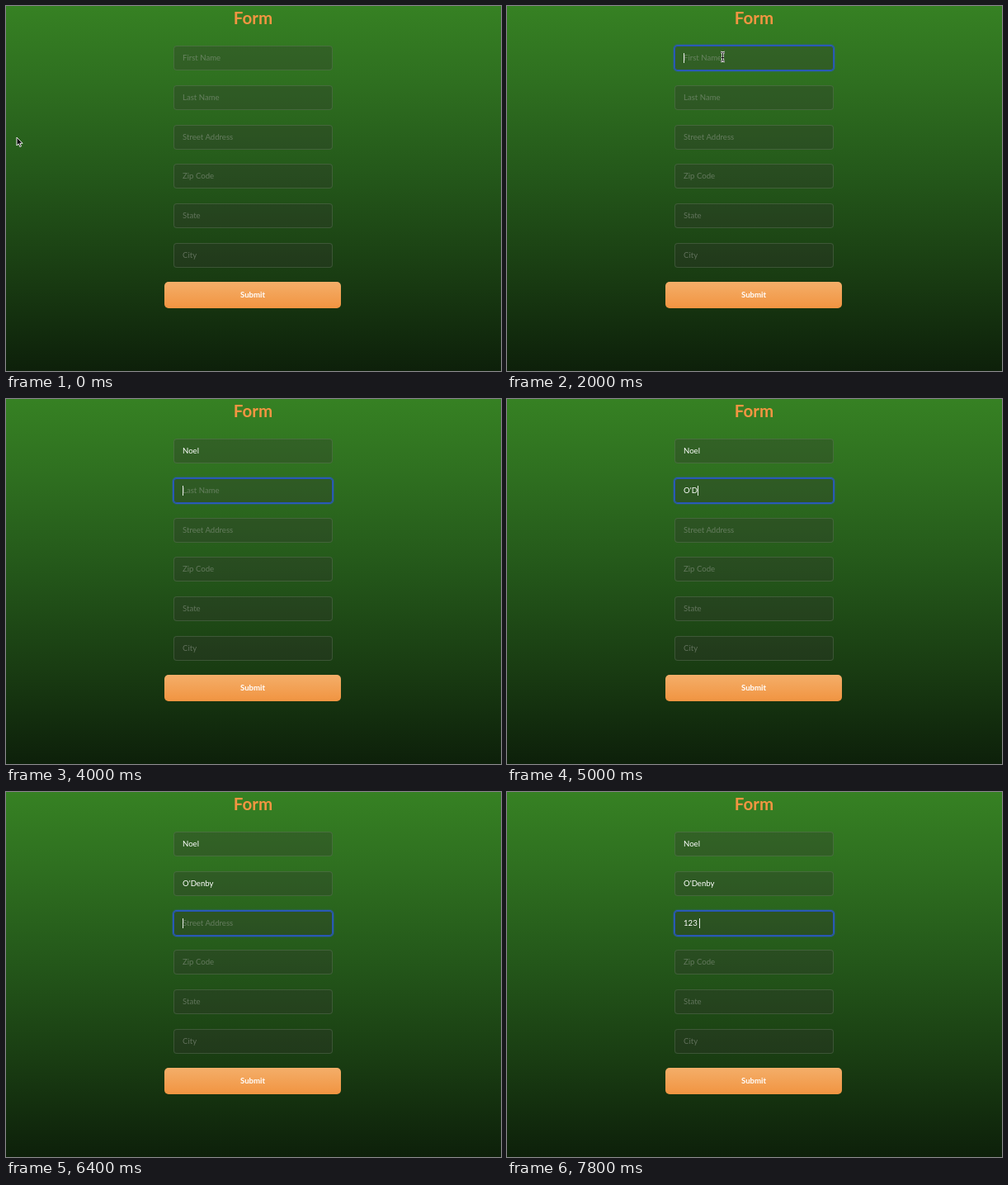
Animation, 600 px wide and 442 px high, one loop 8 s. Source, as an HTML page:

```html
<!DOCTYPE html>
<html lang="en">
<head>
<meta charset="utf-8">
<title>Form</title>
<style>
  html, body { margin: 0; width: 100%; height: 100%; overflow: hidden; }
  #stage {
    position: relative; width: 600px; height: 442px; overflow: hidden;
    background: linear-gradient(#368123, #2f7020 20%, #24581a 46%, #193c12 74%, #0d200a);
    font: 9.6px/30px Lato, "Open Sans", sans-serif; color: #fff;
  }
  h1 {
    position: absolute; left: 0; top: 0; width: 599px; margin: 0;
    font: 700 20.5px/29px Lato, "Open Sans", sans-serif; text-align: center; color: #f39542;
  }
  .field {
    position: absolute; left: 203px; width: 193px; height: 30px; padding-left: 11px;
    box-sizing: border-box; border-radius: 4px; white-space: pre;
    background: rgba(52, 48, 46, .3); box-shadow: inset 0 0 0 1px rgba(118, 140, 112, .32);
  }
  .focused { box-shadow: 0 0 0 1px #2b5cbe, inset 0 0 0 1px #2855ae, 0 0 2px 1px #2b5cbe; }
  .hint { color: rgba(160, 166, 156, .5); }
  .caret {
    display: inline-block; width: 1px; height: 12px; margin-right: -1px;
    vertical-align: -2.5px; background: #e8eee6;
  }
  .submit {
    position: absolute; left: 192px; top: 334px; width: 214px; height: 32px; border-radius: 5px;
    background: linear-gradient(#f4ae69, #f19441); font-weight: 700; line-height: 32px; text-align: center;
  }
  svg { position: absolute; left: 0; top: 0; overflow: visible; }
</style>
</head>
<body>
<div id="stage">
  <h1>Form</h1>
  <div class="submit">Submit</div>
  <svg id="pointer" width="1" height="1">
    <path id="arrow" d="M.5 .5V10.5L2.8 8.4L4.3 12L6 11.3L4.5 7.8H7.6Z" fill="#111" stroke="#fff" stroke-width=".9"/>
    <g id="beam" fill="none">
      <path d="M-2.5-5.5Q0-5.5 0-4Q0-5.5 2.5-5.5M0-4V4M-2.5 5.5Q0 5.5 0 4Q0 5.5 2.5 5.5M-1.5 1H1.5" stroke="#fff" stroke-width="2.4"/>
      <path d="M-2.5-5.5Q0-5.5 0-4Q0-5.5 2.5-5.5M0-4V4M-2.5 5.5Q0 5.5 0 4Q0 5.5 2.5 5.5M-1.5 1H1.5" stroke="#111"/>
    </g>
  </svg>
</div>
<script>
const LOOP = 8000, STEP = 200, BLINK = 1000;
const stage = document.getElementById("stage");
const pointer = document.getElementById("pointer");
const arrow = document.getElementById("arrow");
const beam = document.getElementById("beam");

// focus: when the field becomes active; keys: when each character appears
const entries = [
  { focus: 1000, text: "Noel", keys: [2600, 2800, 3000, 3200] },
  { focus: 4000, text: "O'Denby", keys: [4400, 4800, 5000, 5200, 5400, 5600, 5800] },
  { focus: 6200, text: "123 ", keys: [7200, 7400, 7600, 7800] }
];

function addSpan(parent, className) {
  const span = document.createElement("span");
  span.className = className;
  return parent.appendChild(span);
}

const labels = ["First Name", "Last Name", "Street Address", "Zip Code", "State", "City"];
const fields = labels.map((label, i) => {
  const box = document.createElement("div");
  box.style.top = 48 + Math.round(i * 47.8) + "px";
  stage.insertBefore(box, pointer);
  const value = addSpan(box, "value");
  const caret = addSpan(box, "caret");
  const hint = addSpan(box, "hint");
  hint.textContent = label;
  return { box, value, caret, hint };
});

function drawField(field, i, t) {
  const entry = entries[i];
  const next = entries[i + 1];
  const focused = Boolean(entry) && t >= entry.focus && (!next || t < next.focus);
  const typed = entry ? entry.keys.filter(key => key <= t).length : 0;
  const lastEvent = typed ? entry.keys[typed - 1] : entry && entry.focus;
  const caretOn = focused && (t - lastEvent) % BLINK < BLINK / 2;

  field.box.className = focused ? "field focused" : "field";
  field.value.textContent = typed ? entry.text.slice(0, typed) : "";
  field.hint.style.display = typed ? "none" : "";
  field.caret.style.display = focused ? "" : "none";
  field.caret.style.visibility = caretOn ? "visible" : "hidden";
}

function drawPointer(t) {
  const p = Math.min(t / 1000, 1);
  const eased = p * p * (3 - 2 * p);
  const x = 12.5 + 249 * eased;
  const y = 158.5 - 97 * eased;
  const overField = x > 203 && y < 78;
  pointer.setAttribute("transform", "");
  pointer.style.transform = `translate(${x}px, ${y}px)`;
  pointer.style.display = t < entries[0].keys[0] ? "" : "none";
  arrow.style.display = overField ? "none" : "";
  beam.style.display = overField ? "" : "none";
}

function draw() {
  const t = Math.floor((performance.now() % LOOP) / STEP) * STEP;
  fields.forEach((field, i) => drawField(field, i, t));
  drawPointer(t);
  requestAnimationFrame(draw);
}
draw();
</script>
</body>
</html>
```
